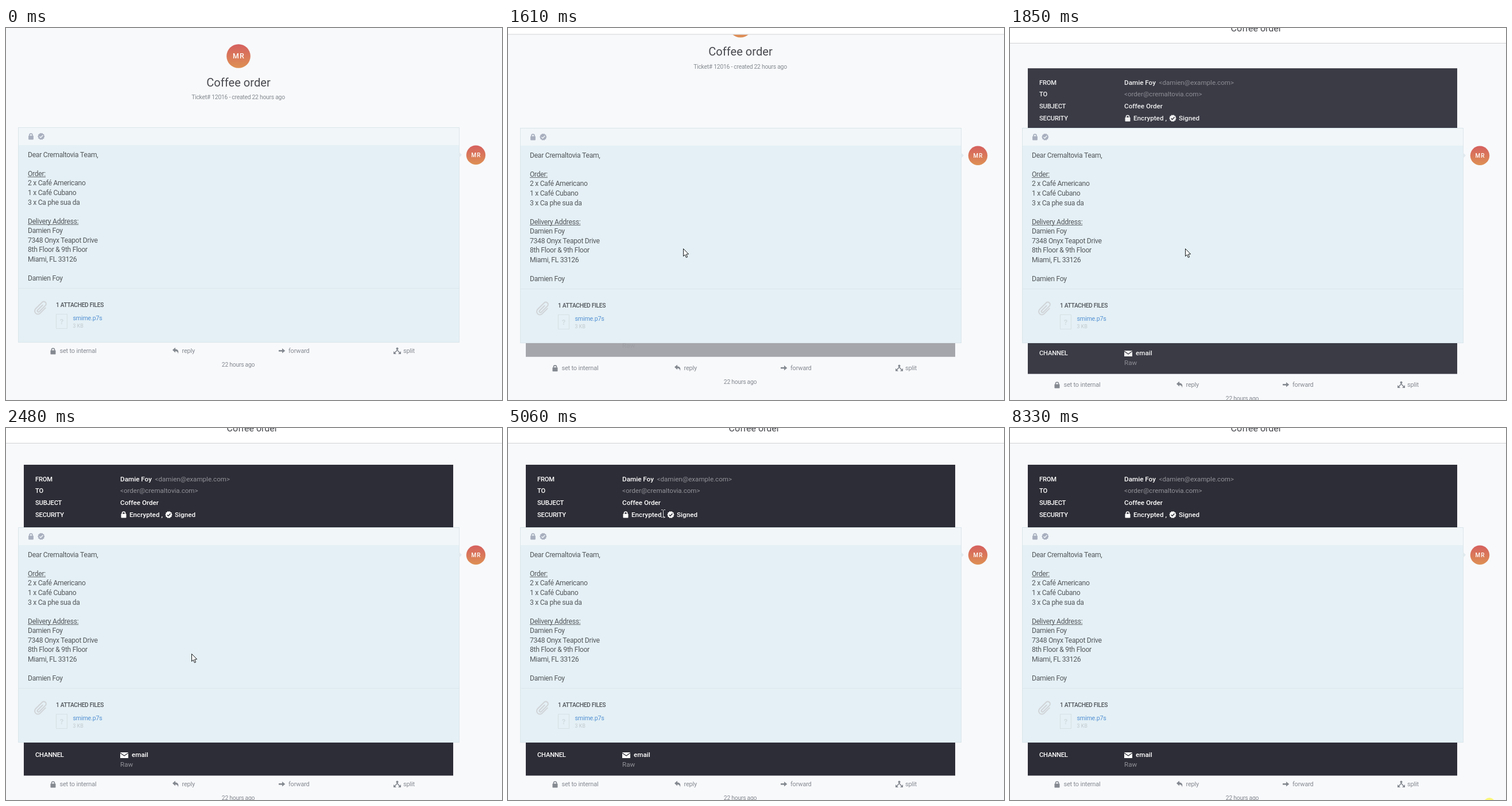
Write an HTML page with a canvas that moves like this. It is 864 px wide and 648 px high and loops after 8480 ms.

```html
<!DOCTYPE html>
<html lang="en">
<head>
<meta charset="utf-8">
<title>Ticket security details</title>
<style>
html, body { margin: 0; width: 100%; height: 100%; overflow: hidden; background: #f8f9fb; }
canvas { display: block; width: 864px; height: 648px; }
</style>
</head>
<body>
<canvas id="stage" width="864" height="648"></canvas>
<script>
const ctx = document.getElementById('stage').getContext('2d');
const LOOP = 8480;
const UI = 'Roboto, "Open Sans", sans-serif';
const TIP = '"Noto Sans", "Open Sans", sans-serif';
const PAGE = '#f8f9fb', BODY = '#e4f0f5', HEAD = '#f1f6f9', DARK = '#2d2d37';
const OPEN_STEPS = [1520, 1610, 1680, 1770, 1850, 1930, 2010, 2090];

// Text styles: [weight, size, letter spacing, family]
const STYLE = {
  title: [400, 20.1, 0, UI],
  barTitle: [400, 16, 0, UI],
  note: [400, 10.4, -0.27, UI],
  body: [400, 12.2, -0.3, UI],
  action: [400, 11, -0.2, UI],
  files: [500, 10.3, -0.35, UI],
  link: [400, 10.7, -0.2, UI],
  size: [400, 8.6, 0.2, UI],
  label: [500, 11.2, -0.2, UI],
  strong: [500, 11.7, 0, UI],
  plain: [400, 11.6, 0, UI],
  bigInitials: [500, 12.4, 1.1, UI],
  initials: [500, 10, 1, UI],
  mark: [700, 13, 0, UI],
  tip: [400, 10, -0.29, TIP]
};

const clamp = v => Math.max(0, Math.min(1, v));
const easeOut = (t, start, length, power) => 1 - (1 - clamp((t - start) / length)) ** power;

function text(str, x, y, style, color, align = 'left') {
  const [weight, size, spacing, family] = STYLE[style];
  ctx.font = `${weight} ${size}px ${family}`;
  ctx.letterSpacing = spacing + 'px';
  ctx.textAlign = align;
  ctx.fillStyle = color;
  ctx.fillText(str, x, y);
  return ctx.measureText(str).width;
}

function rect(x, y, w, h, color) {
  ctx.fillStyle = color;
  ctx.fillRect(x, y, w, h);
}

function frame(x, y, w, h, color) {
  ctx.strokeStyle = color;
  ctx.lineWidth = 1;
  ctx.strokeRect(x + 0.5, y + 0.5, w - 1, h - 1);
}

function shape(points, fill) {
  ctx.beginPath();
  points.forEach(([x, y]) => ctx.lineTo(x, y));
  ctx.closePath();
  ctx.fillStyle = fill;
  ctx.fill();
}

function line(points, color, width) {
  ctx.beginPath();
  points.forEach(([x, y], i) => i ? ctx.lineTo(x, y) : ctx.moveTo(x, y));
  ctx.strokeStyle = color;
  ctx.lineWidth = width;
  ctx.stroke();
}

function disc(x, y, r, fill) {
  ctx.beginPath();
  ctx.arc(x, y, r, 0, Math.PI * 2);
  ctx.fillStyle = fill;
  ctx.fill();
}

function at(x, y, draw) {
  ctx.save();
  ctx.translate(x, y);
  draw();
  ctx.restore();
}

function avatar(x, y, r, style) {
  const g = ctx.createLinearGradient(0, y - r, 0, y + r);
  g.addColorStop(0, '#d5605f');
  g.addColorStop(1, '#de9054');
  disc(x, y, r, g);
  const size = STYLE[style][1];
  text('MR', x + 0.5, y + size * 0.36, style, '#fff', 'center');
}

function lock(x, y, scale, color) {
  at(x, y, () => {
    ctx.scale(scale, scale);
    ctx.beginPath();
    ctx.roundRect(-4.5, -1.5, 9, 7, 0.8);
    ctx.fillStyle = color;
    ctx.fill();
    ctx.beginPath();
    ctx.moveTo(-2.6, -1);
    ctx.lineTo(-2.6, -2.4);
    ctx.arc(0, -2.4, 2.6, Math.PI, 0);
    ctx.lineTo(2.6, -1);
    ctx.strokeStyle = color;
    ctx.lineWidth = 1.6;
    ctx.stroke();
  });
}

function badge(x, y, color, tick) {
  at(x, y, () => {
    const rim = Array.from({ length: 20 }, (_, i) => {
      const r = i % 2 ? 5.2 : 6.2, a = i * Math.PI / 10;
      return [r * Math.cos(a), r * Math.sin(a)];
    });
    shape(rim, color);
    line([[-2.8, 0.2], [-0.8, 2.2], [3, -2]], tick, 1.5);
  });
}

function paperclip(x, y) {
  at(x, y, () => {
    ctx.rotate(Math.PI / 4);
    ctx.beginPath();
    ctx.moveTo(5.5, -6);
    ctx.lineTo(5.5, 7);
    ctx.arc(0, 7, 5.5, 0, Math.PI);
    ctx.lineTo(-5.5, -9);
    ctx.arc(-1.5, -9, 4, Math.PI, 0);
    ctx.lineTo(2.5, 6);
    ctx.arc(0.5, 6, 2, 0, Math.PI);
    ctx.lineTo(-1.5, -6);
    ctx.strokeStyle = '#d0d4d8';
    ctx.lineWidth = 2;
    ctx.lineCap = 'round';
    ctx.stroke();
  });
}

function envelope(x, y) {
  rect(x, y, 14, 10, '#fff');
  line([[x, y + 1], [x + 7, y + 6], [x + 14, y + 1]], DARK, 1.2);
}

function heading(dy) {
  avatar(405, 49 + dy, 20.8, 'bigInitials');
  text('Coffee order', 405, 101.5 + dy, 'title', '#48494e', 'center');
  text('Ticket# 12016 - created 22 hours ago', 404.5, 123.7 + dy, 'note', '#868c91', 'center');
}

function actions(dy) {
  const ink = '#858a91';
  at(0, dy, () => {
    lock(82, 563, 1, ink);
    text('set to internal', 93.5, 566.3, 'action', ink);

    shape([[290, 561], [295, 556.8], [295, 559.3]], ink);
    ctx.beginPath();
    ctx.moveTo(290, 561);
    ctx.lineTo(295, 556.8);
    ctx.lineTo(295, 559.3);
    ctx.quadraticCurveTo(302, 560, 300, 568);
    ctx.quadraticCurveTo(299.5, 563, 295, 563);
    ctx.lineTo(295, 565.5);
    ctx.fill();
    text('reply', 306.5, 566.3, 'action', ink);

    rect(475, 561, 7, 2.6, ink);
    shape([[481, 558], [486.3, 562.3], [481, 566.6]], ink);
    text('forward', 492, 566.3, 'action', ink);

    line([[681.5, 558], [681.5, 561], [677, 566]], ink, 1.6);
    line([[681.5, 561], [686, 566]], ink, 1.6);
    disc(681.5, 558.6, 2, ink);
    shape([[675, 563], [675, 568], [680, 568]], ink);
    shape([[688, 563], [688, 568], [683, 568]], ink);
    text('split', 692, 566.3, 'action', ink);

    text('22 hours ago', 404.5, 590.3, 'note', '#858a91', 'center');
  });
}

function clipped(y, h, alpha, draw) {
  ctx.save();
  ctx.beginPath();
  ctx.rect(0, y, 864, h);
  ctx.clip();
  ctx.globalAlpha = alpha;
  draw();
  ctx.restore();
}

function topPanel(dy) {
  at(0, dy, () => {
    rect(31, 64, 748, 110, DARK);
    ['FROM', 'TO', 'SUBJECT', 'SECURITY'].forEach((s, i) =>
      text(s, 51, 92.6 + i * 20.7, 'label', '#fff'));
    text('Damie Foy', 199, 92.6, 'strong', '#fff');
    text('<damien@example.com>', 259.5, 92.6, 'plain', '#92929a');
    text('<order@cremaltovia.com>', 199, 113.3, 'plain', '#92929a');
    text('Coffee Order', 199, 134, 'strong', '#fff');
    lock(205, 151, 1, '#fff');
    text('Encrypted ,', 215, 154.7, 'strong', '#fff');
    badge(283.5, 151, '#fff', DARK);
    text('Signed', 294, 154.7, 'strong', '#fff');
  });
}

function bottomPanel(dy) {
  at(0, dy, () => {
    rect(31, 547, 748, 58.5, DARK);
    text('CHANNEL', 51, 573.2, 'label', '#fff');
    envelope(199, 565);
    text('email', 219, 573.2, 'strong', '#fff');
    text('Raw', 199, 590, 'plain', '#92929a');
  });
}

const MESSAGE = [
  'Dear Cremaltovia Team,', '', '_Order:', '2 x Café Americano', '1 x Café Cubano',
  '3 x Ca phe sua da', '', '_Delivery Address:', 'Damien Foy', '7348 Onyx Teapot Drive',
  '8th Floor & 9th Floor', 'Miami, FL 33126', '', 'Damien Foy'
];

function article(dy) {
  at(0, dy, () => {
    rect(21, 173, 768, 32, HEAD);
    rect(21, 204, 768, 343, BODY);
    rect(21, 453, 768, 1, '#dae7ed');
    frame(21, 173, 769, 375, '#dae6eb');
    shape([[789, 216], [794, 221], [789, 226]], '#e0eaef');
    lock(43.5, 189, 0.98, '#a8afbe');
    badge(61.3, 188.8, '#a8afbe', HEAD);

    MESSAGE.forEach((row, i) => {
      const y = 224.6 + i * 16.58, under = row[0] === '_';
      const w = text(under ? row.slice(1) : row, 38, y, 'body', '#55595d');
      if (under) rect(38, Math.round(y + 1.4), w, 1, '#6a6e72');
    });

    paperclip(60.5, 488);
    text('1 ATTACHED FILES', 87, 486.2, 'files', '#50555a');
    frame(87, 498, 20, 26, '#d6e1e6');
    text('?', 97, 515.6, 'mark', '#d2dde2', 'center');
    text('smime.p7s', 116.5, 509.2, 'link', '#5591d4');
    text('3 KB', 116.5, 522, 'size', '#bfc8cd');
    avatar(818.5, 221.3, 16.7, 'initials');
  });
}

function stickyBar(bottom) {
  if (bottom <= 0) return;
  rect(0, 0, 864, bottom, '#fff');
  rect(0, bottom - 1, 864, 1, '#d0d2d5');
  text('Coffee order', 384.5, bottom - 21, 'barTitle', '#48494e');
}

function tooltip(x, y, w, h, str) {
  rect(x, y, w, h, '#28282b');
  frame(x, y, w, h, '#85858a');
  text(str, x + 6.5, y + h / 2 + 3.9, 'tip', '#f4f4f4');
}

const subject = (org, mail) =>
  `/C=DE/ST=Berlin/L=Germany/O=${org}/OU=IT/CN=${mail}/emailAddress=${mail}`;

// Pointer moves: [first step, last step, points]; it rests on the last point.
const MOVES = [
  [660, 820, [[60, 469], [228, 410], [305, 384]]],
  [2480, 3270, [[323, 393], [328, 388], [305, 365], [276, 337], [245, 285], [222, 235],
    [212, 202], [209, 172], [212, 158], [226, 152], [234, 151]]],
  [4830, 5360, [[236, 150], [244, 150], [256, 149], [270, 149], [284, 149], [296, 149],
    [304, 149], [308, 149]]],
  [6370, 6450, [[309, 148], [310, 146]]],
  [7000, 7150, [[313, 147], [322, 150], null]]
];

function pointerAt(t) {
  const move = MOVES.findLast(m => t >= m[0]);
  if (!move) return null;
  const [from, to, points] = move, last = points.length - 1;
  return points[Math.floor(clamp((t - from) / (to - from)) * last + 1e-6)];
}

function pointer(x, y) {
  at(x, y, () => {
    if (y < 165) {
      line([[-3, -6.5], [-0.5, -6.5]], '#d8d8dc', 1);
      line([[1.5, -6.5], [4, -6.5]], '#d8d8dc', 1);
      line([[0.5, -6], [0.5, 6]], '#d8d8dc', 1);
      line([[-3, 6.5], [-0.5, 6.5]], '#d8d8dc', 1);
      line([[1.5, 6.5], [4, 6.5]], '#d8d8dc', 1);
      return;
    }
    shape([[0.5, 0.5], [0.5, 13.6], [3.4, 10.9], [5.4, 15.8], [7.6, 14.9],
      [5.5, 10.1], [9.6, 9.8]], '#fff');
    ctx.strokeStyle = '#15181a';
    ctx.lineWidth = 1;
    ctx.stroke();
  });
}

function draw(t) {
  const step = OPEN_STEPS.findLast(s => s <= t) ?? 0;
  const settled = step === 2090;
  const nudge = step && !settled ? 1 : 0;
  const grow = easeOut(step, 1514, 330, 2);
  const slide = settled ? 1 : easeOut(step, 1520, 560, 3);
  const rise = easeOut(step, 1630, 345, 3);

  rect(0, 0, 864, 648, PAGE);
  heading(nudge - 109 * grow);
  actions(nudge + 58 * grow);
  if (rise > 0) clipped(0, 174 + nudge, slide, () => topPanel(nudge + 109 * (1 - rise)));
  if (slide > 0) clipped(547 + nudge, 101, slide, () => bottomPanel(nudge - 57 * (1 - slide)));
  article(nudge);
  stickyBar(27 * clamp((step - 1520) / 211));

  if (t >= 3650 && t < 4980) {
    tooltip(240, 162, 570, 21, subject('Cremaltovia Corp', 'order@cremaltovia.com'));
  }
  if (t >= 5440 && t < 7000) {
    tooltip(314, 161, 640, 20, subject('Generous Merchant Corp', 'damien@example.com'));
  }

  if (t >= 1120 && t < 1210) disc(305, 384, 10, '#fbf77a');
  if (t >= 8330) disc(835, 654, 10, '#fbf77a');
  const p = pointerAt(t);
  if (p) pointer(...p);
}

const start = performance.now();
function tick() {
  draw((performance.now() - start) % LOOP);
  requestAnimationFrame(tick);
}
tick();
</script>
</body>
</html>
```
